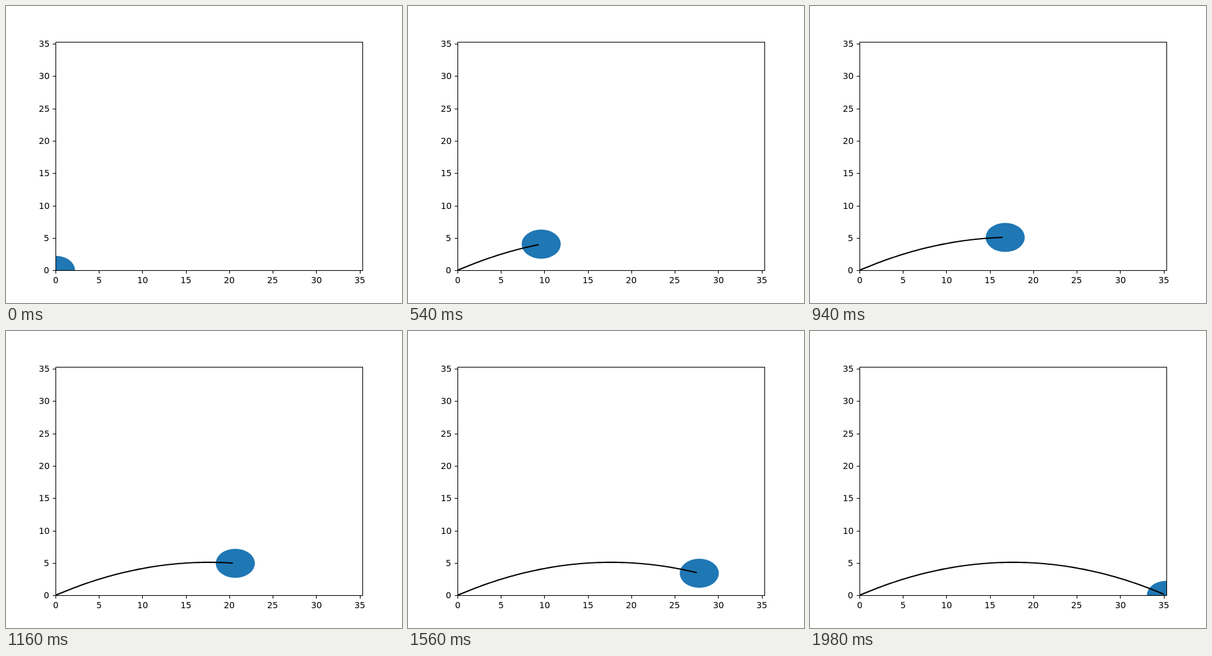
Animation, 640 px wide and 480 px high, one loop 2 s. Source, as an HTML page with a canvas:

```html
<!DOCTYPE html>
<html>
<head>
<meta charset="utf-8">
<style>
  html, body { margin: 0; overflow: hidden; background: #fff; }
  canvas { display: block; }
</style>
</head>
<body>
<canvas id="stage" width="640" height="480"></canvas>
<script>
const ctx = document.getElementById("stage").getContext("2d");
const G = 9.81, SPEED = 20, ANGLE = Math.PI / 6;
const RANGE = SPEED ** 2 * Math.sin(2 * ANGLE) / G;
const FLIGHT = 2 * SPEED * Math.sin(ANGLE) / G;
const STEPS = 100, STEP_MS = 20, RADIUS = 2.25;
const LEFT = 80, BOTTOM = 427.2, W = 496, H = 369.6;

const px = x => LEFT + x / RANGE * W;
const py = y => BOTTOM - y / RANGE * H;
const snap = v => Math.round(v) + 0.5;

function position(i) {
  const t = FLIGHT * i / (STEPS - 1);
  return [px(SPEED * Math.cos(ANGLE) * t),
          py(SPEED * Math.sin(ANGLE) * t - G * t * t / 2)];
}

function segment(x1, y1, x2, y2) {
  ctx.beginPath();
  ctx.moveTo(x1, y1);
  ctx.lineTo(x2, y2);
  ctx.stroke();
}

function drawAxes() {
  const left = snap(LEFT), bottom = snap(BOTTOM);
  ctx.lineWidth = 1.11;
  ctx.lineCap = "butt";
  ctx.strokeStyle = ctx.fillStyle = "#000";
  ctx.font = '13.89px "DejaVu Sans", sans-serif';
  ctx.strokeRect(left, snap(BOTTOM - H), W, bottom - snap(BOTTOM - H));
  for (let v = 0; v <= 35; v += 5) {
    const x = snap(px(v)), y = snap(py(v));
    const width = ctx.measureText(v).width;
    segment(x, bottom, x, bottom + 5);
    segment(left - 5, y, left, y);
    ctx.fillText(v, Math.round(px(v) - width / 2), 448);
    ctx.fillText(v, Math.round(70.3 - width), Math.round(py(v) + 5));
  }
}

function drawFlight(step) {
  ctx.save();
  ctx.beginPath();
  ctx.rect(LEFT, 58, W, 369);
  ctx.clip();

  ctx.fillStyle = "#1f77b4";
  ctx.beginPath();
  ctx.ellipse(...position(step), RADIUS / RANGE * W, RADIUS / RANGE * H, 0, 0, 2 * Math.PI);
  ctx.fill();

  // The trail ends one step behind the ball.
  if (step > 1) {
    ctx.strokeStyle = "#000";
    ctx.lineWidth = 2.083;
    ctx.lineCap = "square";
    ctx.lineJoin = "round";
    ctx.beginPath();
    for (let i = 0; i < step; i++) ctx.lineTo(...position(i));
    ctx.stroke();
  }
  ctx.restore();
}

function draw() {
  ctx.fillStyle = "#fff";
  ctx.fillRect(0, 0, 640, 480);
  drawFlight(Math.floor((performance.now() - start) / STEP_MS) % STEPS);
  drawAxes();
  requestAnimationFrame(draw);
}

const start = performance.now();
draw();
</script>
</body>
</html>
```
